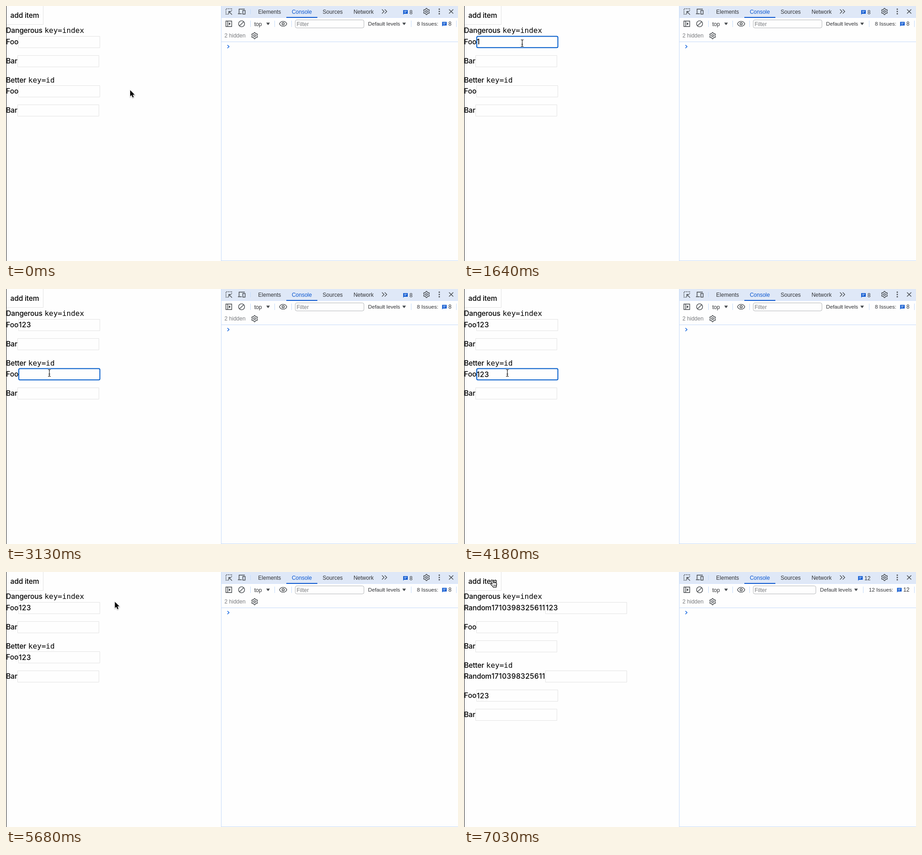
These frames come from a looping animation (990x559 px, 8000 ms). An HTML page with a canvas:

```html
<!DOCTYPE html>
<html lang="en">
<head>
<meta charset="utf-8">
<title>List keys demo</title>
<style>
  html, body { margin: 0; width: 100%; height: 100%; overflow: hidden; background: #fefefe; }
  canvas { display: block; }
</style>
</head>
<body>
<canvas id="stage" width="990" height="559"></canvas>
<script>
const ctx = document.getElementById('stage').getContext('2d');
const LOOP = 8000, STEP = 150;
const UI_FONT = '"Liberation Sans", Arial, sans-serif';
const BODY_FONT = '450 15.5px Inter, sans-serif';
const MONO_FONT = '16px "DejaVu Sans Mono", monospace';
const BLUE = '#0b57d0', INK = '#303236', ICON = '#43474b';
const GREY = '#7b7d80', RULE = '#c4daf9', BORDER = '#e3e3e3';

const INPUT_W = 179, INPUT_H = 26, ROW = 42, HEADING = 24.5;
const FIRST_FOCUS = 750, SECOND_FOCUS = 3130, BLUR = 5230, ADDED = 7030;

// Pointer journeys; each starts where the previous one ended
const JOURNEYS = [
  { at: 150, steps: 4, x: 127, y: 81 },
  { at: 2380, steps: 1, x: 126, y: 96.5 },
  { at: 2530, steps: 4, x: 94.5, y: 183.5 },
  { at: 4630, steps: 4, x: 335, y: 91.5 },
  { at: 5530, steps: 5, x: 61, y: 17.5 }
];

function rect(x, y, w, h, color) {
  ctx.fillStyle = color;
  ctx.fillRect(x, y, w, h);
}

function box(x, y, w, h, r, color, width = 1) {
  ctx.beginPath();
  ctx.roundRect(x, y, w, h, r);
  ctx.strokeStyle = color;
  ctx.lineWidth = width;
  ctx.stroke();
}

function circle(x, y, r) {
  ctx.beginPath();
  ctx.arc(x, y, r, 0, 2 * Math.PI);
  ctx.strokeStyle = ICON;
  ctx.lineWidth = 1.4;
  ctx.stroke();
}

// SVG path data placed at x, y
function shape(d, x, y, { fill, stroke, width = 1.4 }) {
  const path = new Path2D(d);
  ctx.save();
  ctx.translate(x, y);
  if (fill) {
    ctx.fillStyle = fill;
    ctx.fill(path);
  }
  if (stroke) {
    ctx.strokeStyle = stroke;
    ctx.lineWidth = width;
    ctx.stroke(path);
  }
  ctx.restore();
}
const outline = (d, x, y) => shape(d, x, y, { stroke: ICON });

// Each text helper returns the width it has drawn
function text(str, x, y, font, color, spacing = 0) {
  ctx.font = font;
  ctx.letterSpacing = spacing + 'px';
  ctx.fillStyle = color;
  ctx.fillText(str, x, y);
  return ctx.measureText(str).width;
}
const ui = (str, x, y, color = INK, size = 12) => text(str, x, y, `${size}px ${UI_FONT}`, color);

// Digits are set looser than letters
function body(str, x, y) {
  let end = x;
  for (const run of str.match(/\d+|\D+/g) || []) {
    end += text(run, end, y, BODY_FONT, '#000', /\d/.test(run) ? 0.42 : -0.15);
  }
  return end - x;
}

function gear(x, y) {
  ctx.beginPath();
  for (let i = 0; i < 24; i++) {
    const r = i % 4 < 2 ? 6.8 : 5.1;
    const a = (i - 0.5) * Math.PI / 12 - Math.PI / 2;
    ctx.lineTo(x + r * Math.cos(a), y + r * Math.sin(a));
  }
  ctx.closePath();
  ctx.strokeStyle = ICON;
  ctx.lineWidth = 1.4;
  ctx.stroke();
  circle(x, y, 2.1);
}

const triangle = (x, y) => shape('M0 0H8L4 5.5Z', x, y, { fill: ICON });

// Right-aligned message icon with the issue count
function issues(count, right, baseline) {
  const w = 6.67 * String(count).length;
  const x = right - w - 13.8, y = baseline - 8.6;
  shape('M0 0H10V8H2L0 10Z', x, y, { fill: BLUE });
  rect(x + 2, y + 2, 6, 1, '#fff');
  rect(x + 2, y + 4.6, 4.5, 1, '#fff');
  ui(count, right - w, baseline);
}

function tabBar(count) {
  rect(472, 0, 518, 26, '#dfe8f7');
  rect(472, 25, 518, 1, '#d3e3fd');
  rect(614, 24, 68, 2, BLUE);
  rect(535, 7, 1, 11, RULE);

  ctx.setLineDash([2, 1.6]);
  outline('M-1 6H-6.3V-6H6.3V-1', 488, 12);
  ctx.setLineDash([]);
  outline('M7 7L.5 .5M0 5.5V0H5.5', 488, 12);
  outline('M-5.5 4V-5.2H7M-8 5H.5M2.7-2.2H7.7V5.8H2.7Z', 516, 12);

  let x = 552.3;
  for (const tab of ['Elements', 'Console', 'Sources', 'Network']) {
    x += ui(tab, x, 16.5, tab === 'Console' ? BLUE : INK) + 23.6;
  }

  outline('M.5-4.5L5 0L.5 4.5M6.5-4.5L11 0L6.5 4.5', 823, 12);
  issues(count, 890.4, 17.5);
  gear(921, 12);
  for (let y = 7; y <= 17; y += 5) rect(947.7, y - 1.3, 2.6, 2.6, ICON);
  outline('M-4.6-4.6L4.6 4.6M4.6-4.6L-4.6 4.6', 975, 12);
}

function toolbar(count) {
  const shift = 13.3 * (1 - String(count).length);
  for (const x of [535, 588, 625, 887 + shift, 986]) rect(Math.round(x), 32, 1, 14, RULE);

  outline('M-6.4-6H6.4V6H-6.4ZM-2.5-6V6', 488, 39);
  shape('M0-3.3L4 0L0 3.3Z', 488, 39, { fill: ICON });
  circle(516, 39, 6.6);
  outline('M-4.6 4.6L4.6-4.6', 516, 39);
  ui('top', 543.7, 43.5);
  triangle(570, 36.5);
  outline('M-8 0C-5-7.2 5-7.2 8 0C5 7.2-5 7.2-8 0Z', 607, 39);
  circle(607, 39, 2.5);

  box(633.5, 30.5, 150.5 + shift, 17.5, 3.5, '#b3b5b8');
  ui('Filter', 636.5, 43.8, GREY);
  ui('Default levels', 793 + shift, 43.3, INK, 11.7);
  triangle(868 + shift, 36.5);
  ui(count + ' Issues:', 900 + shift, 43.3, INK, 11.7);
  issues(count, 975.7, 43.3);

  ui('2 hidden', 478.6, 69.4, GREY);
  gear(544.5, 65);
}

function devtools(count) {
  tabBar(count);
  toolbar(count);
  rect(471, 0, 1, 559, RULE);
  rect(472, 78, 518, 1, RULE);
  rect(472, 558, 518, 1, RULE);
  shape('M0-3.4L3.6 0L0 3.4', 485, 89, { stroke: '#1a6be0', width: 1.5 });
}

// Draws a labelled field and returns its top left corner
function inputRow([label, value], top, focused) {
  const x = Math.round(0.3 + body(label, 0.3, top + 17.8));
  const y = Math.floor(top);
  if (focused) box(x + 1, y + 0.6, INPUT_W - 1.4, INPUT_H - 1.4, 2.5, '#005bca', 2);
  else box(x + 0.5, y + 0.5, INPUT_W - 1, INPUT_H - 1, 0, BORDER);
  body(value, x + 1, top + 18.4);
  return { x, y };
}

function group(title, code, top, rows, focused) {
  const w = body(title + ' ', 0.3, top - 6.7);
  text(code, w + 1, top - 6.7, MONO_FONT, '#000');
  return rows.map((row, i) => inputRow(row, top + i * ROW, focused && i === 0));
}

// One digit per step
const typed = (t, start) => '123'.slice(0, Math.max(0, 1 + Math.floor((t - start) / 145)));

function page(t) {
  const first = typed(t, 1640), second = typed(t, 3880);
  const byIndex = [['Foo', first], ['Bar', '']];
  const byId = [['Foo', second], ['Bar', '']];
  if (t >= ADDED) {
    const name = 'Random1710398325611';
    byIndex[0][1] = '';
    byIndex.unshift([name, first]);
    byId.unshift([name, '']);
  }

  rect(0, 0, 1, 559, '#1c1c1c');
  rect(81, 0, 1, 41, BORDER);
  rect(1, 40, 81, 1, BORDER);
  body('add item', 9.6, 26);

  const top = 66, nextTop = top + byIndex.length * ROW + HEADING;
  return [
    ...group('Dangerous', 'key=index', top, byIndex, t >= FIRST_FOCUS && t < SECOND_FOCUS),
    ...group('Better', 'key=id', nextTop, byId, t >= SECOND_FOCUS && t < BLUR)
  ];
}

function arrow(x, y) {
  const d = 'M0 0V13.6L3.1 10.7L5.4 16L7.7 15L5.5 9.9H9.8Z';
  ctx.save();
  ctx.shadowColor = 'rgba(0,0,0,.35)';
  ctx.shadowBlur = 2;
  ctx.shadowOffsetY = 1;
  shape(d, x, y, { stroke: '#fff', width: 1.8 });
  ctx.restore();
  shape(d, x, y, { fill: '#000' });
}

function ibeam(x, y) {
  const d = 'M-3-7.5H-1.2L0-6.3L1.2-7.5H3M0-6.5V6.5M-3 7.5H-1.2L0 6.3L1.2 7.5H3M-1.8 2.5H1.8';
  shape(d, x + 0.5, y + 0.5, { stroke: '#fff', width: 2.6 });
  shape(d, x + 0.5, y + 0.5, { stroke: '#111', width: 1.2 });
}

function hand(x, y) {
  const d = 'M-1.6 1.4C-2-.2 .4-.9 1.1 .6L3.2 5.2C3.8 4.2 5.3 4.3 5.8 5.2' +
    'C6.6 4.3 7.9 4.6 8.2 5.5C9.2 5 10.2 5.6 10.4 6.8C11 9.6 10.6 11.2 9.8 13.2L9.6 15.8H3' +
    'C2.4 13.6-.6 11.6-2.6 9.4C-4.4 7.4-2.6 6.2-1 7.4L.8 8.7Z';
  shape(d, x, y, { stroke: '#fff', width: 2.6 });
  shape(d, x, y, { fill: '#fff', stroke: '#000', width: 1.2 });
  for (let i = 0; i < 3; i++) {
    shape('M0 0L.7 2.3M.8 5L1.1 8.2', x + 3.3 + i * 2.4, y + 5.2, { stroke: '#000', width: 1 });
  }
}

function pointerAt(t) {
  let x = 272, y = 184.5;
  for (const leg of JOURNEYS) {
    if (t < leg.at) break;
    const k = Math.min(1, (1 + Math.floor((t - leg.at) / STEP)) / leg.steps);
    const ease = k * k * (3 - 2 * k);
    x += (leg.x - x) * ease;
    y += (leg.y - y) * ease;
  }
  return [x, y];
}

function pointer(t, inputs) {
  const [x, y] = pointerAt(t);
  const overInput = inputs.some(f =>
    x >= f.x && x < f.x + INPUT_W && y >= f.y && y < f.y + INPUT_H);
  if (overInput) ibeam(x, y);
  else if (x < 82 && y < 41) hand(x, y);
  else arrow(x, y);
}

const start = performance.now();

function draw() {
  const t = (performance.now() - start) % LOOP;
  rect(0, 0, 990, 559, '#fefefe');
  const inputs = page(t);
  devtools(t >= ADDED ? 12 : 8);
  pointer(t, inputs);
  requestAnimationFrame(draw);
}
draw();
</script>
</body>
</html>
```
